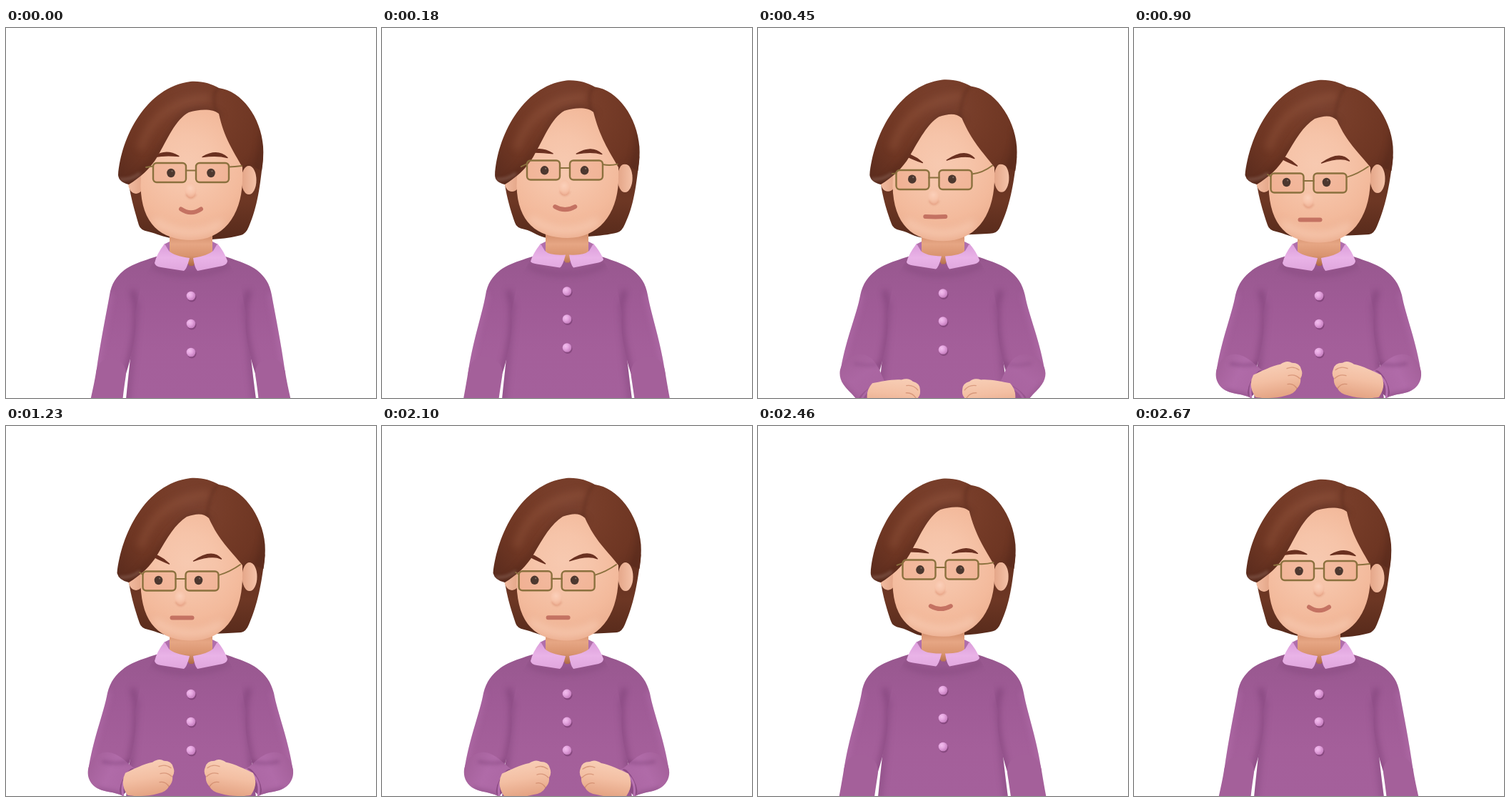
An HTML page with a canvas for the animation above (2.7 s loop, 518 px wide and 518 px high).

```html
<!DOCTYPE html>
<html lang="en">
<head>
<meta charset="utf-8">
<title>Annoyed character</title>
<style>
html, body { margin: 0; width: 100%; height: 100%; overflow: hidden; background: #fff; }
canvas { display: block; width: 100vmin; height: 100vmin; }
</style>
</head>
<body>
<canvas id="stage" width="518" height="518"></canvas>
<script>
const ctx = document.getElementById('stage').getContext('2d');
const LOOP = 2700, STEP = 30;

// Face centre x/y, anger, chest lift, elbow x/radius, forearm angle/length
const FIELDS = ['x', 'y', 'anger', 'lift', 'elbowX', 'elbowR', 'angle', 'reach'];
const CALM = [259, 202.5, 0, 0, 147, 21, 99, 110];
const ANGRY = [244.5, 217, 1, 0, 142, 27, 26, 29];
const KEYS = [
  [0, CALM],
  [180, [256, 199, 0.14, -6.5, 144.5, 24, 99, 112]],
  [450, [246.5, 212.5, 0.9, -3.5, 142, 27, 56, 29]],
  [570, ANGRY],
  [2070, ANGRY],
  [2460, [255.5, 201, 0.16, -5, 144, 24, 99, 112]],
  [2670, CALM]
];

const mix = (a, b, k) => a + (b - a) * k;
const clamp01 = v => Math.max(0, Math.min(1, v));

function slope(i, f) {
  const prev = KEYS[i - 1], next = KEYS[i + 1];
  if (!prev || !next || KEYS[i][1] === ANGRY) return 0;
  return (next[1][f] - prev[1][f]) / (next[0] - prev[0]);
}

function poseAt(t) {
  let i = 0;
  while (i < KEYS.length - 2 && t >= KEYS[i + 1][0]) i++;
  const [t0, a] = KEYS[i], [t1, b] = KEYS[i + 1];
  const span = t1 - t0, u = clamp01((t - t0) / span), v = 1 - u;
  const pose = {};
  FIELDS.forEach((name, f) => {
    pose[name] = a[f] * v * v * (1 + 2 * u) + b[f] * u * u * (3 - 2 * u)
      + span * u * v * (v * slope(i, f) - u * slope(i + 1, f));
  });
  const blink = Math.sin(Math.PI * clamp01((t - 900) / 330));
  pose.eyeOpen = 1 - 0.9 * Math.min(1, blink * 1.1);
  return pose;
}

function fill(style, path) {
  ctx.fillStyle = style;
  ctx.fill(new Path2D(path));
}

function line(style, width, path) {
  ctx.strokeStyle = style;
  ctx.lineWidth = width;
  ctx.stroke(new Path2D(path));
}

function oval(style, x, y, rx, ry = rx) {
  ctx.fillStyle = style;
  ctx.beginPath();
  ctx.ellipse(x, y, rx, ry, 0, 0, Math.PI * 2);
  ctx.fill();
}

function withStops(gradient, colors) {
  colors.forEach((c, i) => gradient.addColorStop(i / (colors.length - 1), c));
  return gradient;
}
const linear = (x0, y0, x1, y1, ...colors) =>
  withStops(ctx.createLinearGradient(x0, y0, x1, y1), colors);
const radial = (x, y, r, ...colors) =>
  withStops(ctx.createRadialGradient(x, y, 0, x, y, r), colors);
const cloth = () => linear(0, 320, 0, 518, '#98588f', '#9f5b96', '#a45f9a', '#a4609b');

function blurred(radius, draw) {
  ctx.save();
  ctx.filter = `blur(${radius}px)`;
  draw();
  ctx.restore();
}

function clipped(path, draw) {
  ctx.save();
  ctx.clip(new Path2D(path));
  draw();
  ctx.restore();
}

function mirrored(draw) {
  draw(0);
  ctx.save();
  ctx.translate(517, 0);
  ctx.scale(-1, 1);
  draw(1);
  ctx.restore();
}

function drawBackHair(p) {
  const b = p.lift * 0.5, a = p.anger;
  fill(linear(0, 190, 0, 295, '#63301f', '#6d3724', '#572a1b'),
    `M170,200 C172,232 181,258 ${186 + a},${276 + b} Q${188 + a},${283 + b} 199,${285 + b}
     C212,${288 + b} 220,293 232,294 L288,${296 + b - a * 5}
     C305,${295 + b - a * 5} 318,${293 + b - a * 3} 329,${290 + b - a}
     Q336,${288 + b} 340,${278 + b} C352,250 ${356 + a * 2},222 ${360 + a * 2.5},180 L330,150 H190 Z`);
}

function drawTorso(p) {
  const body = `M216,318 C190,327 165,333 156,350 L180,395 C177,440 172,480 168,520
    H350 C345,480 340,440 337,395 L361,350 C352,333 326,327 302,318 Z`;
  fill(cloth(), body);
  clipped(body, () => blurred(5, () => {
    line('rgba(105,50,100,.35)', 8, 'M181,385 C178,440 173,480 168,525 M337,385 C340,440 345,480 350,525');
    line('rgba(110,55,105,.35)', 6, 'M206,333 Q230,346 258,344 Q290,344 311,331');
  }));
  for (const y of [375, 414, 454]) {
    oval('rgba(95,40,90,.4)', 260, y + 2 + p.lift, 6.5);
    oval(radial(257, y - 2 + p.lift, 8, '#f3bfee', '#e5a6e0', '#c982c2'), 259, y + p.lift, 6.3);
  }
}

function drawHand() {
  const fist = `M-1,-11 C10,-16 25,-24 37,-26 Q46,-32 53,-28 Q64,-28 66,-19 Q69,-12 65,-6
    Q66,2 60,8 Q56,16 44,18 C30,22 12,22 2,20 Q-9,4 -1,-11 Z`;
  fill(linear(20, -27, 28, 21, '#f8cfb7', '#f3bfa3', '#e4a383'), fist);
  line('rgba(190,112,82,.5)', 1.3, 'M46,-20 Q55,-24 63,-18 M48,-10 Q57,-13 64,-6 M47,2 Q55,0 60,8');
}

function drawSleeveEnd(p, bend) {
  const r = p.elbowR, w = mix(26, 21, bend), len = p.reach + 5;
  const sleeve = `M0,${-r} C${len * .4},${-r} ${len * .7},${-w} ${len},${-w}
    Q${len + 5},0 ${len},${w} C${len * .6},${w} ${len * .3},${r} 0,${r}
    C${-r * 1.33},${r} ${-r * 1.33},${-r} 0,${-r} Z`;
  fill('#a4609a', sleeve);
  ctx.globalAlpha = bend;
  fill(linear(-r, 0, len, 0, 'rgba(186,116,180,0)', 'rgba(186,116,180,.55)', 'rgba(178,108,171,.55)'), sleeve);
  clipped(sleeve, () => blurred(3, () =>
    line('rgba(105,48,100,.4)', 5, `M0,${r} C${len * .3},${r} ${len * .6},${w} ${len},${w}`)));
  oval('#8d4c85', len - 3, 0, 7, w - 1);
  line('#b873b2', 3, `M${len},${-w + 1} Q${len - 15},0 ${len},${w - 1}`);
  ctx.globalAlpha = 1;
}

function drawArm(p, side) {
  const ex = p.elbowX, ey = 484, r = p.elbowR;
  const bend = clamp01((99 - p.angle) / 73);
  const shoulder = 145 - bend * 3;
  const upper = `M207,326 C174,331 150,342 ${shoulder},374
    C${shoulder - 5},402 ${ex - r + 6},440 ${ex - r},${ey}
    L${ex + r},${ey} C${ex + r + 9},455 184,425 181,400 L190,355 Z`;
  fill(cloth(), upper);
  clipped(upper, () => blurred(4, () => {
    line('rgba(195,125,190,.3)', 8, `M${shoulder},374 C${shoulder - 5},402 ${ex - r + 6},440 ${ex - r},${ey}`);
    line('rgba(100,44,95,.42)', 7, `M178,370 Q184,390 182,410 C182,435 ${ex + r + 6},460 ${ex + r},${ey + 5}`);
  }));

  const a = p.angle * Math.PI / 180;
  ctx.save();
  ctx.translate(ex, ey);
  ctx.save();
  ctx.rotate(a);
  drawSleeveEnd(p, bend);
  ctx.restore();
  blurred(2.5, () => line(`rgba(105,48,100,${bend * .35})`, 4, `M${r + 4},-14 Q12,-10 -6,-14`));
  ctx.translate(Math.cos(a) * p.reach + side * 4, Math.sin(a) * p.reach);
  ctx.rotate((p.angle - 26) * Math.PI / 360);
  drawHand();
  ctx.restore();
}

function drawNeckAndCollar(p) {
  const d = p.lift * 0.7;
  fill('#b06fab', 'M221,303 L229,299 V322 Z M297,303 L289,299 V322 Z');
  fill(linear(0, 286, 0, 335, '#d08a67', '#e6a684', '#d9946f', '#a7633f'),
    `M229,280 H289 V${325 + d} L264,${330 + d} L262,${333 + d} H257 L255,${330 + d} L229,${325 + d} Z`);
  const pink = linear(0, 303, 0, 340, '#dc9edb', '#e9b3e7', '#e0a6dd');
  fill(pink, `M222,302 Q211,316 208,${329 + d * .5} Q209,${334 + d} 217,${335 + d} L249,${340 + d}
    Q253,${338 + d} 257,${322 + d} Q235,319 228,312 Z`);
  fill(pink, `M296,302 Q305,312 310,${326 + d * .5} Q310,${331 + d} 303,${333 + d} L268,${340 + d}
    Q264,${336 + d} 262,${322 + d} Q282,319 290,312 Z`);
}

function drawFace(p) {
  const a = p.anger, chin = 297 + p.lift * 0.55 + a * 3.5;
  const earY = p.lift * 0.4 - a * 2;
  oval(linear(170, 0, 194, 0, '#f2bda2', '#e2a284'), 182, 217 + earY, 11, 15);
  oval(linear(328, 0, 350, 0, '#e2a284', '#f4c1a7'), 340 + a, 213 + earY, 10.5, 20);
  const head = `M190,170 L188.5,222 C190,${chin - 23} 216,${chin} 260,${chin}
    C303,${chin} 329,${chin - 33} 331,215 V130 L300,100 H250 Z`;
  fill(radial(254, 190, 118, '#f7c9b0', '#f6c4a9', '#f3ba9c', '#eaab8c'), head);
  clipped(head, () => blurred(6, () =>
    line('rgba(255,222,202,.5)', 10, `M210,${chin - 25} Q255,${chin + 3} 300,${chin - 22}`)));
  drawFeatures(p);
}

function brow(p, [x0, y0, px, py, x1, y1]) {
  const from = `${p.x + x0},${p.y + y0}`, to = `${p.x + x1},${p.y + y1}`;
  const shape = `M${from} Q${p.x + px},${p.y + py} ${to} Q${p.x + px},${p.y + py + 9} ${from} Z`;
  fill('#6a3020', shape);
  line('#6a3020', 1.4, shape);
}

function drawFeatures(p) {
  const a = p.anger, { x, y } = p;
  const blend = (calm, angry) => calm.map((v, i) => mix(v, angry[i], a));
  brow(p, blend([-51, -22, -36, -34, -17, -23], [-51, -41, -30, -38, -16, -24]));
  brow(p, blend([16, -22, 37, -34, 51, -21], [18, -28, 44, -46, 57, -31]));

  for (const side of [-28, 28]) {
    const ex = x + side - a * 3, ey = y + 0.5 - a * 1.5;
    oval('#22211f', ex, ey, 5.8, 6.2 * p.eyeOpen);
    if (p.eyeOpen > 0.6) oval('rgba(170,170,170,.5)', ex + 1.5, ey - 2.5, 1.1);
  }

  const nose = y + 25 - a;
  oval(radial(x - 1, nose - 3, 14, '#fbd0ba', '#f7c4aa', '#eeae91'), x - .5, nose, 8, 11);
  blurred(1, () =>
    line('rgba(214,135,105,.5)', 1.5, `M${x - 7},${nose + 6} Q${x},${nose + 16} ${x + 7},${nose + 6}`));

  const mx = x + a * 2, my = y + mix(51, 51.5, a), curve = 9.5 * (1 - a);
  line('#c47262', 6, `M${mx - 14},${my} Q${mx},${my + curve} ${mx + 14},${my}`);
}

function drawFrontHair(p) {
  const a = p.anger, l = p.lift * 0.2;
  const top = 115 + (p.y - 202.5) * 0.62;
  const peak = 298 - a * 14, left = 157 - a * 1.5 - l, right = 360 + a * 2.5;
  const crown = 75 - a * 2 + l;
  const hair = `M${left},206 C161,153 ${196 - a * 2},${crown + 8} 258,${crown}
    C275,${crown - 1} 287,${crown + 3} 298,${crown + 9}
    C330,${crown + 13} ${right - 3},125 ${right},166 Q${right + 1},182 ${right - 2},200
    L350,196 Q340,186 331,195 C${318 - a * 5},172 ${305 - a * 6},${top + 38} ${peak},${top + 5}
    C${peak - 8},${top - 2} ${272 - a * 4},${top - 2} ${256 - a * 3},${top + 3}
    C237,${top + 13} 226,156 212,180 C202,197 188,209 172,219 Q158,216 ${left},206 Z`;
  fill(radial(262, 112, 145, '#7b4230', '#763c28', '#6e3623', '#5a2b1d'), hair);
  clipped(hair, () => {
    blurred(5, () => {
      line('rgba(155,92,67,.3)', 13, `M190,165 C203,128 230,102 280,${crown + 23}`);
      line('rgba(60,25,16,.32)', 7, `M${peak},${top + 7} Q270,${top - 4} 253,${top + 5} C232,${top + 18} 219,178 172,220`);
      line('rgba(65,28,18,.3)', 8, `M${right},145 Q${right},180 347,202`);
    });
    blurred(2, () => {
      line('rgba(70,30,20,.3)', 3, `M298,${crown + 9} Q286,${crown + 15} ${peak - 3},${top + 4}`);
      line('rgba(195,165,155,.4)', 3, 'M160,212 Q175,213 187,204');
    });
  });
}

function drawGlasses(p) {
  const { x, y, anger: a } = p, gold = '#8b713e';
  const h = 27, half = 53;
  for (const side of [-1, 1]) {
    ctx.beginPath();
    ctx.roundRect(side < 0 ? x - half : x + 7, y - h / 2, 46, h, 5);
    ctx.fillStyle = 'rgba(226,135,105,.22)';
    ctx.fill();
    ctx.strokeStyle = gold;
    ctx.lineWidth = 2.4;
    ctx.stroke();
  }
  line(gold, 2.2, `M${x - 7},${y - 3} H${x + 7}`);
  const earY = 193 + p.lift * 0.4;
  line(gold, 1.8, `M${x + half},${y - 8} Q${mix(320, 314, a)},${mix(earY + 1, 204, a)} ${330 - a * 2},${earY + a}`);
  line(gold, 1.8, `M${x - half},${y - 9} L${mix(196, 187, a)},${mix(earY + 2, 205, a)}`);
}

function draw(t) {
  const p = poseAt(t);
  ctx.fillStyle = '#fff';
  ctx.fillRect(0, 0, 518, 518);
  ctx.lineCap = ctx.lineJoin = 'round';
  drawBackHair(p);
  drawTorso(p);
  mirrored(side => drawArm(p, side));
  drawNeckAndCollar(p);
  drawFace(p);
  drawFrontHair(p);
  drawGlasses(p);
}

const start = performance.now();
function tick() {
  const t = (performance.now() - start) % LOOP;
  draw(Math.floor(t / STEP) * STEP);
  requestAnimationFrame(tick);
}
tick();
</script>
</body>
</html>
```
